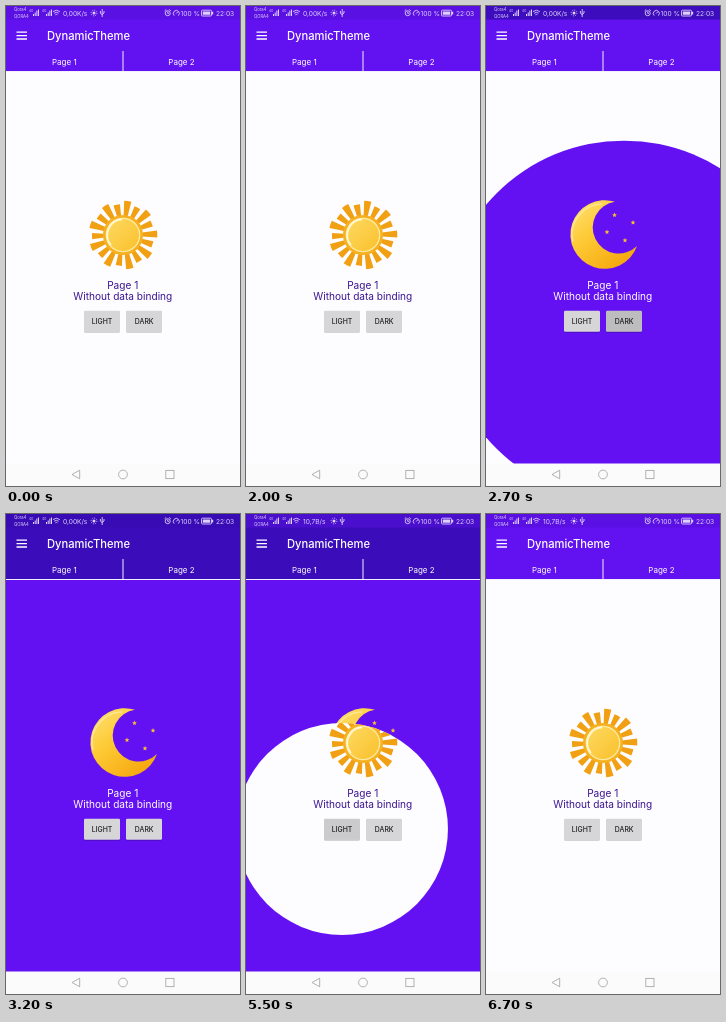
An HTML page for the animation above (7300 ms loop, 234 by 480 pixels).

```html
<!DOCTYPE html>
<html lang="en">
<head>
<meta charset="utf-8">
<title>DynamicTheme</title>
<style>
  html, body { margin: 0; width: 100%; height: 100%; overflow: hidden; background: #fdfcfe; }
  svg { position: absolute; left: 0; top: 0; width: 234px; height: 480px; }
  svg.defs { width: 0; height: 0; }
  text { font-family: Inter, Roboto, sans-serif; }
  .mid { text-anchor: middle; }
  .label { font-size: 6.9px; font-weight: 500; fill: #222; }

  .light { --page: #fdfcfe; --bar: #6211f1; --ink: #3a1492; --sun: 1; --moon: 0; }
  .dark { --page: #6311f3; --bar: #3a0cba; --ink: #fff; --sun: 0; --moon: 1; }
  .page { fill: var(--page); }
  .bar { fill: var(--bar); }
  .ink { fill: var(--ink); }
  .sun { opacity: var(--sun); }
  .moon { opacity: var(--moon); }

  .to-dark, .to-light, .status, .speed-a, .speed-b, .press { animation: 7300ms linear infinite; }
  .to-dark { animation-name: to-dark; }
  .to-light { animation-name: to-light; }
  .status { animation-name: status; }
  .speed-a { animation-name: speed-a; }
  .speed-b { animation-name: speed-b; }
  .press { opacity: 0; }
  .press.d { animation-name: press-dark; }
  .press.l { animation-name: press-light; }

  @keyframes to-dark {
    0% { clip-path: circle(0px at 138px 315px); }
    31.59% { clip-path: circle(0px at 138px 315px); animation-timing-function: cubic-bezier(.364, 0, .636, 1); }
    45.29%, 100% { clip-path: circle(534px at 138px 315px); }
  }
  @keyframes to-light {
    0% { clip-path: circle(0px at 96px 315px); }
    71.33% { clip-path: circle(0px at 96px 315px); animation-timing-function: cubic-bezier(.364, 0, .636, 1); }
    85.03%, 100% { clip-path: circle(534px at 96px 315px); }
  }
  @keyframes status {
    0%, 31% { fill: #5b10e3; }
    38%, 71.3% { fill: #380bb5; }
    79%, 100% { fill: #5b10e3; }
  }
  @keyframes speed-a { 0%, 53.42% { opacity: 1; } 53.43%, 100% { opacity: 0; } }
  @keyframes speed-b { 0%, 53.42% { opacity: 0; } 53.43%, 100% { opacity: 1; } }
  @keyframes press-dark { 0%, 29.5% { opacity: 0; } 32%, 36% { opacity: .14; } 41%, 100% { opacity: 0; } }
  @keyframes press-light { 0%, 70% { opacity: 0; } 72%, 76% { opacity: .05; } 81%, 100% { opacity: 0; } }
</style>
</head>
<body>
<svg class="defs">
  <defs>
    <linearGradient id="moon-fill" x1="0" y1="0" x2=".8" y2="1">
      <stop offset="0" stop-color="#ffe27a"/>
      <stop offset=".45" stop-color="#fdca35"/>
      <stop offset="1" stop-color="#f6a50c"/>
    </linearGradient>
    <linearGradient id="sun-fill" x1="0" y1="0" x2="1" y2="1">
      <stop offset="0" stop-color="#fdda62"/>
      <stop offset="1" stop-color="#fac02c"/>
    </linearGradient>
    <path id="star" d="M0-2.4 .7-.8 2.3-.7 1.1.5 1.4 2.1 0 1.3-1.4 2.1-1.1.5-2.3-.7-.7-.8Z" fill="#fbc02d"/>
    <g id="button">
      <rect x="-18" y=".6" width="36" height="21.6" rx="1.4" fill="#000" opacity=".16"/>
      <rect x="-18" width="36" height="21" rx="1.2" fill="#d6d5d7"/>
    </g>

    <g id="app">
      <rect class="page" width="234" height="480"/>
      <rect class="bar" width="234" height="65.5"/>
      <path d="M0 65.5H234M117 45V65.5" stroke="#f4efff"/>
      <path d="M10.5 26.2H21M10.5 29.6H21M10.5 33H21" stroke="#fff" stroke-width="1.3"/>
      <text x="41" y="34.2" font-size="11.2" font-weight="500" fill="#fff">DynamicTheme</text>
      <g class="mid" font-size="8" fill="#fff">
        <text x="58.3" y="59">Page 1</text>
        <text x="175.5" y="59">Page 2</text>
      </g>

      <g class="sun" fill="none">
        <g transform="rotate(-88 117 229)" stroke="#f2a013">
          <circle cx="117" cy="229" r="26.8" stroke-width="15" pathLength="18" stroke-dasharray=".62 1.38"/>
          <circle cx="117" cy="229" r="25" stroke-width="12" pathLength="18" stroke-dasharray=".6 1.4" stroke-dashoffset="-1"/>
        </g>
        <circle cx="117" cy="229" r="20" fill="#f6b121"/>
        <circle cx="117" cy="229" r="16.7" fill="url(#sun-fill)" stroke="#fdeaa2" stroke-width="1.3"/>
        <path d="M105 239A15.6 15.6 0 0 1 116 213.4" stroke="#fff7d8" stroke-width="1.6"/>
      </g>

      <g class="moon">
        <path d="M129 195.8A34.3 34.3 0 1 0 151 240A26 26 0 1 1 129 195.8Z" fill="url(#moon-fill)"/>
        <path d="M87 236A30.5 30.5 0 0 1 116 198" fill="none" stroke="#fff0ad" stroke-width="1.5" opacity=".7"/>
        <use href="#star" x="128.5" y="209"/>
        <use href="#star" x="147" y="216.5"/>
        <use href="#star" x="121" y="226"/>
        <use href="#star" x="139" y="234.3"/>
      </g>

      <g class="mid ink" font-size="10.1">
        <text x="116.7" y="282.6">Page 1</text>
        <text x="116.8" y="294.4">Without data binding</text>
      </g>
      <use href="#button" x="96" y="304.7"/>
      <use href="#button" x="138" y="304.7"/>
      <g class="mid label">
        <text x="96" y="317.8">LIGHT</text>
        <text x="138.2" y="317.8">DARK</text>
      </g>
    </g>
  </defs>
</svg>

<svg class="light"><use href="#app"/></svg>
<svg class="dark to-dark"><use href="#app"/></svg>
<svg class="light to-light"><use href="#app"/></svg>

<svg>
  <rect class="press d" x="120" y="304.7" width="36" height="21" rx="1.2"/>
  <rect class="press l" x="78" y="304.7" width="36" height="21" rx="1.2"/>

  <rect class="status" width="234" height="13.5"/>
  <g fill="#ddd0fb" font-size="6.6">
    <g font-size="4.2">
      <text x="8" y="5.4">Qora4</text>
      <text x="8" y="11.6">QORA4</text>
      <text x="23" y="6" font-size="3.2">4G</text>
      <text x="36" y="6" font-size="3.2">4G</text>
    </g>
    <path d="M27 10V8h1v2zM28.7 10V6.4h1V10zM30.4 10V4.6h1V10zM32 10V3.6h1V10z"/>
    <path d="M40 10V8h1v2zM41.7 10V6.4h1V10zM43.4 10V4.6h1V10zM45 10V3.6h1V10z"/>
    <g fill="none" stroke="#ddd0fb" stroke-width=".9">
      <path d="M47 5.6Q50.4 2.8 53.8 5.6M48.2 7.2Q50.4 5.4 52.6 7.2M49.4 8.8Q50.4 8 51.4 8.8"/>
      <circle cx="88" cy="7" r="2.9" stroke-dasharray="1 1.2"/>
      <path d="M96.2 3V11M94.4 5V7.2L96.2 8.6 98 7V5"/>
      <circle cx="161.7" cy="7.2" r="2.5"/>
      <path d="M161.7 5.6V7.3H163M158.6 4.8 160.2 3.4M164.8 4.8 163.2 3.4"/>
      <path d="M168.2 9.6A3 3 0 1 1 172.4 9.6M170.2 7.5 171.8 5.8"/>
      <rect x="195.5" y="4.2" width="10" height="5.8" rx="1"/>
    </g>
    <circle cx="88" cy="7" r="1.5"/>
    <path d="M196.8 5.5h7.4v3.2h-7.4zM206 5.8h1.2v2.6H206z"/>
    <text class="speed-a" x="57" y="9.5">0,00K/s</text>
    <text class="speed-b" x="57" y="9.5">10,7B/s</text>
    <text x="174.6" y="9.5">100 %</text>
    <text x="210" y="9.5">22:03</text>
  </g>

  <rect y="457.5" width="234" height="22.5" fill="#fcfbfc"/>
  <g fill="none" stroke="#aaa8ac" stroke-width=".9">
    <path d="M66 468.5 73.7 464.2V472.8Z"/>
    <circle cx="117" cy="468.5" r="4.4"/>
    <rect x="159.8" y="464.4" width="8.2" height="8.2"/>
  </g>
</svg>
</body>
</html>
```
